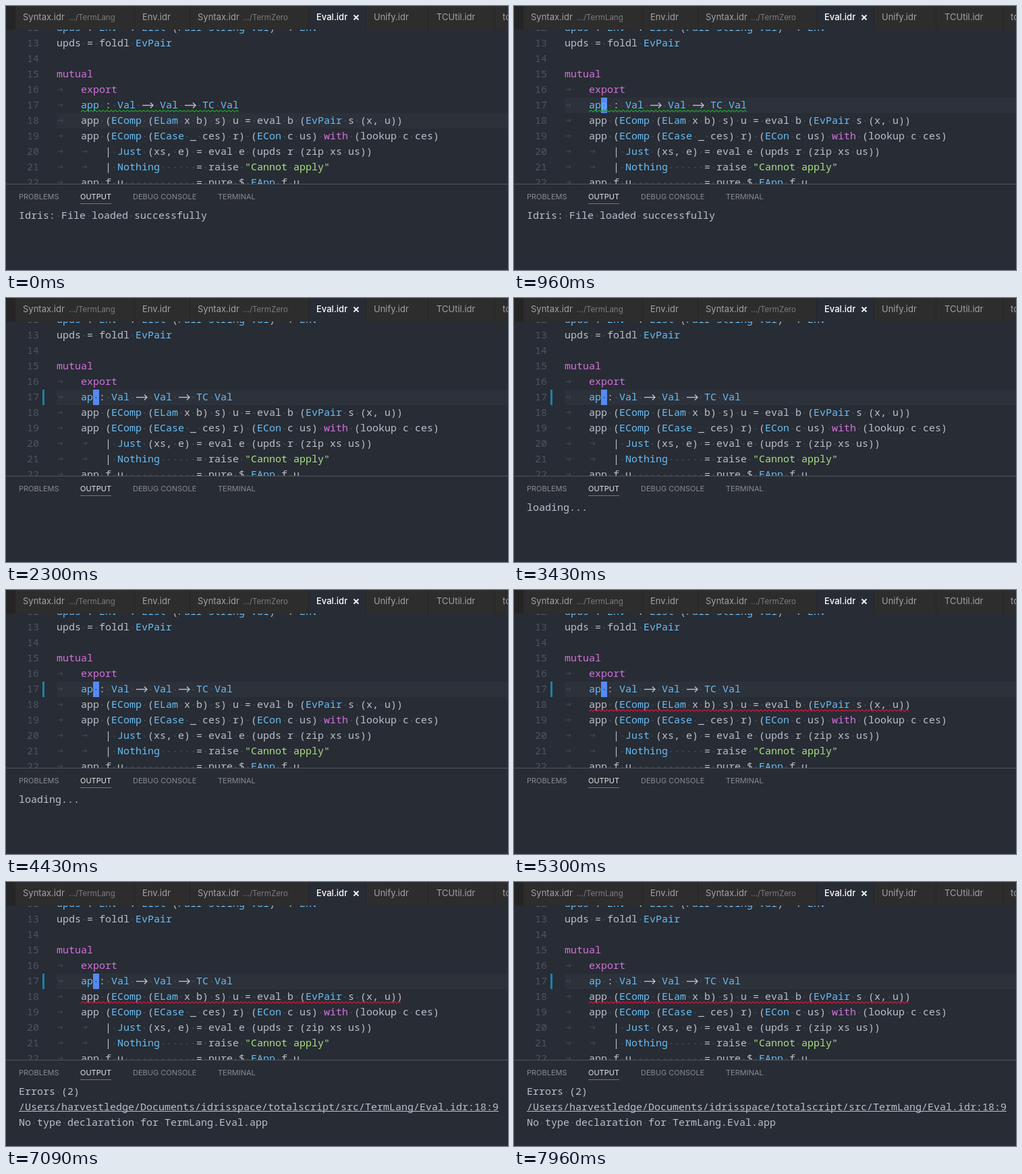
An HTML page with a canvas that plays this animation: 744x392 px, repeating every 8000 ms.

```html
<!DOCTYPE html>
<html lang="en">
<head>
<meta charset="utf-8">
<title>Editor: load error after an edit</title>
<style>
  html, body { margin: 0; width: 100%; height: 100%; overflow: hidden; background: #282c34; }
  canvas { display: block; }
</style>
</head>
<body>
<canvas width="744" height="392"></canvas>
<script>
const ctx = document.querySelector('canvas').getContext('2d');
const LOOP = 8000, CHAR = 9, ROW = 23, CODE_X = 75;
const MONO = '15px "Noto Sans Mono", "DejaVu Sans Mono", monospace';
const UI = 'Inter, "Open Sans", sans-serif';
const COLOR = {
  bg: '#282c34', line: '#2c313a', text: '#bbc0ca', name: '#69bdf3', keyword: '#d371dd',
  string: '#aadf86', number: '#4d5463', space: '#464c58', cursor: '#568af2', gutter: '#1b81a8',
};

// Moments of the story, in ms.
const MOVE_UP = 500, DELETE = 1560, GUTTER = 1740, SAVE = 2040, LOADING = 2400;
const FAIL = 5200, ERRORS = 5450, LINK = 6000;
const KEYS = [-700, MOVE_UP, DELETE, SAVE];

const FIRST_LINE = 12;
const CODE = [
  'upds : Env -> List (Pair String Val) -> Env',
  'upds = foldl EvPair',
  '',
  'mutual',
  '\texport',
  '\tapp : Val -> Val -> TC Val',
  '\tapp (EComp (ELam x b) s) u = eval b (EvPair s (x, u))',
  '\tapp (EComp (ECase _ ces) r) (ECon c us) with (lookup c ces)',
  '\t\t| Just (xs, e) = eval e (upds r (zip xs us))',
  '\t\t| Nothing      = raise "Cannot apply"',
  '\tapp f u            = pure $ EApp f u',
];

const TABS = [
  { x: 14, label: 'Syntax.idr', textX: 25, folder: '…/TermLang', folderX: 93 },
  { x: 191, label: 'Env.idr', textX: 202 },
  { x: 273, label: 'Syntax.idr', textX: 284, folder: '…/TermZero', folderX: 351 },
  { x: 449, label: 'Eval.idr', textX: 460, active: true },
  { x: 534, label: 'Unify.idr', textX: 545 },
  { x: 626, label: 'TCUtil.idr', textX: 638 },
  { x: 725, label: 'totals.idr', textX: 736 },
];

const PANEL_TABS = [['PROBLEMS', 19], ['OUTPUT', 110], ['DEBUG CONSOLE', 188], ['TERMINAL', 314]];
const ERROR_PATH = '/Users/harvestledge/Documents/idrisspace/totalscript/src/TermLang/Eval.idr:18:9';

const lineY = number => 147 + (number - 17) * ROW;

function rect(x, y, w, h, color) {
  ctx.fillStyle = color;
  ctx.fillRect(x, y, w, h);
}

function text(string, x, y, color, font) {
  ctx.font = font;
  ctx.fillStyle = color;
  ctx.fillText(string, x, y);
}

function stroke(points, color, width) {
  ctx.strokeStyle = color;
  ctx.lineWidth = width;
  ctx.beginPath();
  for (const [x, y] of points) ctx.lineTo(x, y);
  ctx.stroke();
}

function arrow(x, y, length, head, color, width) {
  const tip = x + length;
  stroke([[x, y], [tip, y]], color, width);
  stroke([[tip - head, y - head], [tip, y], [tip - head, y + head]], color, width);
}

function squiggle(x1, x2, y, color) {
  const points = [];
  for (let x = x1; x <= x2; x += 3) points.push([x, y + ((x - x1) % 2 ? -1.2 : 1.2)]);
  stroke(points, color, 1.2);
}

// Monospaced text with a faint dot in every space.
function mono(string, x, y, color) {
  text(string, x, y + 5, color, MONO);
  [...string].forEach((char, i) => {
    if (char === ' ') rect(x + i * CHAR + 3.6, y, 1.8, 1.8, COLOR.space);
  });
}

function tokenColor(token, isDeclared) {
  if (/^(mutual|export|with)$/.test(token)) return COLOR.keyword;
  if (token[0] === '"') return COLOR.string;
  return isDeclared || /^[A-Z]/.test(token) ? COLOR.name : COLOR.text;
}

function codeLine(source, y) {
  const declared = (source.match(/^\t*(\w+) :/) || [])[1];
  let column = 0;
  for (const token of source.match(/"[^"]*"|->|\w+|\s|./g) || []) {
    const x = CODE_X + column * CHAR;
    if (token === '\t') arrow(x + 2, y, 7, 2.5, COLOR.space, 1);
    else if (token === '->') arrow(x + 1, y + .5, 16, 4, COLOR.text, 1.4);
    else mono(token, x, y, tokenColor(token, token === declared));
    column += token === '\t' ? 4 : token.length;
  }
}

function cursorVisible(t) {
  const lastKey = KEYS.filter(key => key <= t).pop();
  return (t - lastKey) % 1000 < 500;
}

function drawEditor(t) {
  const current = t < MOVE_UP ? 18 : 17;
  const edited = t >= DELETE;
  rect(CODE_X, lineY(current) - 11, 744, ROW, COLOR.line);
  if (t >= GUTTER) rect(54, lineY(17) - 11, 3, ROW, COLOR.gutter);
  if (cursorVisible(t)) rect(CODE_X + 6 * CHAR, lineY(current) - 11, CHAR, ROW, COLOR.cursor);

  CODE.forEach((source, i) => {
    const number = FIRST_LINE + i;
    text(number, 31, lineY(number) + 5, COLOR.number, MONO);
    codeLine(number === 17 && edited ? source.replace('app', 'ap') : source, lineY(number));
  });

  if (t < SAVE) squiggle(111, edited ? 336 : 345, 156, '#20a020');
  if (t >= FAIL) squiggle(111, 587, 179, '#d0153c');
}

function drawTabs(dirty) {
  rect(0, 0, 744, 35, '#252526');
  TABS.forEach((tab, i) => {
    const end = i + 1 < TABS.length ? TABS[i + 1].x - 1 : 744;
    rect(tab.x, 0, end - tab.x, 35, tab.active ? COLOR.bg : '#2d2d2d');
    text(tab.label, tab.textX, 21, tab.active ? '#fff' : '#a2a2a2', (tab.active ? '500 ' : '') + '13px ' + UI);
    if (tab.folder) text(tab.folder, tab.folderX, 21, '#7c7c7c', '11.5px ' + UI);
  });
  if (dirty) {
    ctx.fillStyle = '#c9cacc';
    ctx.beginPath();
    ctx.arc(519, 17, 4, 0, 2 * Math.PI);
    ctx.fill();
  } else {
    stroke([[515.5, 13.5], [522.5, 20.5]], '#f2f2f2', 2);
    stroke([[522.5, 13.5], [515.5, 20.5]], '#f2f2f2', 2);
  }
}

function outputLines(t) {
  if (t < SAVE) return ['Idris: File loaded successfully'];
  if (t >= ERRORS) return ['Errors (2)', ERROR_PATH, 'No type declaration for TermLang.Eval.app'];
  return t >= LOADING && t < FAIL ? ['loading...'] : [];
}

function drawPanel(t) {
  rect(0, 264, 744, 128, COLOR.bg);
  rect(0, 264, 744, 1, '#50545b');
  for (const [label, x] of PANEL_TABS) {
    text(label, x, 287, label === 'OUTPUT' ? '#e7e7e7' : '#888b90', '11px ' + UI);
  }
  rect(110, 293, 46, 1, '#70747b');
  outputLines(t).forEach((line, i) => mono(line, 19, 311 + i * ROW, COLOR.text));
  if (t >= LINK) rect(19, 340, ERROR_PATH.length * CHAR, 1, COLOR.text);
}

function draw(now) {
  const t = now % LOOP;
  rect(0, 0, 744, 392, COLOR.bg);
  drawEditor(t);
  drawTabs(t >= DELETE && t < SAVE);
  drawPanel(t);
  requestAnimationFrame(draw);
}
requestAnimationFrame(draw);
</script>
</body>
</html>
```
